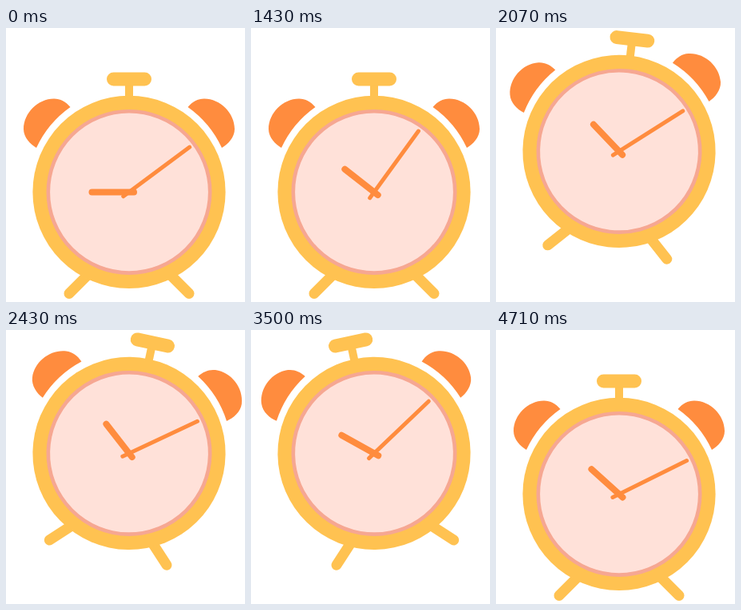
Animation, 299 px wide and 343 px high, one loop 4.78 s. Source, as an HTML page:

```html
<!DOCTYPE html>
<html lang="en">
<head>
<meta charset="utf-8">
<title>Alarm clock</title>
<style>
  html, body { margin: 0; width: 100%; height: 100%; overflow: hidden; background: #fff; }
  svg { display: block; width: 100%; height: 100%; }
  .gold { fill: #ffc251; }
  .leg { stroke: #ffc251; stroke-width: 13; stroke-linecap: round; }
  .bell { fill: #ff8c3e; }
  .face { fill: #ffe1d9; stroke: #f6a792; stroke-width: 4.6; }
  .hand { stroke: #ff8c3e; stroke-linecap: round; }
</style>
</head>
<body>
<svg viewBox="0 0 299 343">
  <defs>
    <path id="bell" class="bell" d="M-116-55.5C-124-60-132-69-132-79C-132-99-114-117-94-117C-86-117-79-113-73.5-106.5A129 129 0 0 0-116-55.5Z"/>
    <path id="leg" class="leg" d="M-75 127L-46 98"/>
  </defs>
  <g id="clock">
    <g id="bells">
      <use href="#bell"/>
      <use href="#bell" transform="scale(-1 1)"/>
    </g>
    <g id="body">
      <use href="#leg"/>
      <use href="#leg" transform="scale(-1 1)"/>
      <rect class="gold" x="-5" y="-136" width="10" height="22"/>
      <rect class="gold" x="-28" y="-150" width="56" height="17" rx="8.5"/>
      <circle class="gold" r="120.6"/>
      <circle class="face" r="101.2"/>
      <line id="hour" class="hand" y1="6" y2="-46.5" stroke-width="8"/>
      <line id="minute" class="hand" y1="9" y2="-94.4" stroke-width="5"/>
    </g>
  </g>
</svg>
<script>
const LOOP = 4780;
const STEP = LOOP / 67;
const SHAKE = 428;
const el = id => document.getElementById(id);
const [clock, bells, body, hour, minute] = ['clock', 'bells', 'body', 'hour', 'minute'].map(el);

// 0 before a, 1 after b, linear between
const ramp = (t, a, b) => Math.min(1, Math.max(0, (t - a) / (b - a)));
const turn = (node, deg) => node.setAttribute('transform', `rotate(${deg})`);

function spin(t) {
  const u = ramp(t, 0, 1615);
  return u * u * (3 - 2 * u) + 0.15 * u * (1 - u) * (1 - u);
}

function lift(t) {
  const rise = 1 - (1 - ramp(t, 1510, 1965)) ** 2;
  return 51 * (rise - ramp(t, 3960, 4415) ** 2);
}

function draw(t) {
  const fast = spin(t);
  const slow = ramp(t, 1615, 4550);
  turn(hour, 270 + 39.4 * fast + 2.6 * slow);
  turn(minute, 53.4 + 355.3 * fast + 15 * slow);

  // the bells swing wide at both ends and run ahead of the body between
  const power = ramp(t, 1600, 1820) * (1 - ramp(t, 4115, 4500));
  const phase = (t - 2430) / SHAKE * 2 * Math.PI;
  const steady = ramp(t, 1790, 2140) * (1 - ramp(t, 3790, 4140));
  turn(body, 12 * power * Math.cos(phase));
  turn(bells, (18.5 - 5.5 * steady) * power * Math.cos(phase + steady * Math.PI / 3));
  clock.setAttribute('transform', `translate(154 ${205.4 - lift(t)})`);
}

const start = performance.now();
function tick() {
  const t = (performance.now() - start) % LOOP;
  draw(Math.floor((t + 2) / STEP) % 67 * STEP);
  requestAnimationFrame(tick);
}
tick();
</script>
</body>
</html>
```
